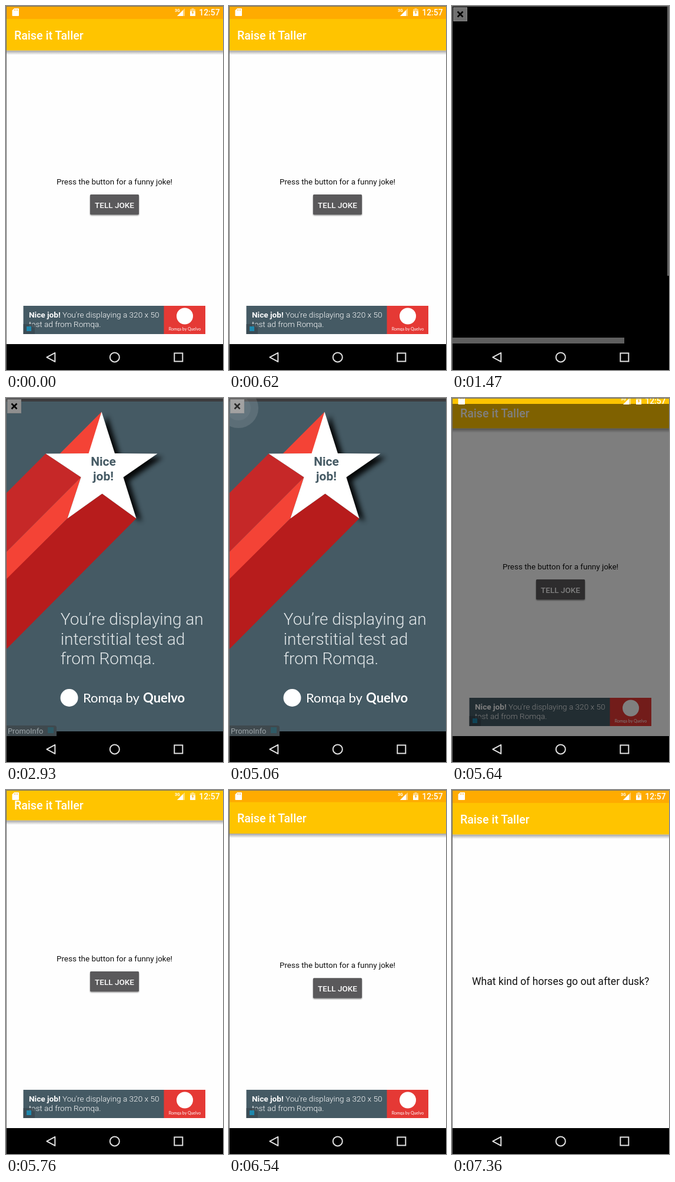
An HTML page that plays this animation: 369 px wide and 618 px high, repeating every 8 s.

```html
<!DOCTYPE html>
<html lang="en">
<head>
<meta charset="utf-8">
<title>Joke app</title>
<style>
  html, body { margin: 0; width: 100%; height: 100%; overflow: hidden; background: #000; }
  svg { display: block; width: 369px; height: 618px; font-family: Roboto, "Open Sans", sans-serif; }
  text { white-space: pre; }
  .mid { text-anchor: middle; }
  .medium { font-weight: 500; }
  .bold { font-weight: 700; }
  .light { font-weight: 300; }
  .logo { font-family: Lato, Roboto, sans-serif; }
</style>
</head>
<body>
<svg viewBox="0 0 369 618" xmlns="http://www.w3.org/2000/svg">
  <defs>
    <linearGradient id="fade" x2="0" y2="1">
      <stop offset="0" stop-color="#000" stop-opacity=".36"/>
      <stop offset="1" stop-color="#000" stop-opacity="0"/>
    </linearGradient>
    <filter id="soft" x="-20%" y="-20%" width="150%" height="150%"><feGaussianBlur stdDeviation="4"/></filter>
    <filter id="lift" x="-10%" y="-20%" width="120%" height="150%"><feGaussianBlur stdDeviation="1"/></filter>
    <clipPath id="buttonClip"><rect x="143" y="320" width="83" height="34" rx="1.5"/></clipPath>
    <clipPath id="stage"><rect width="369" height="574"/></clipPath>
    <path id="star" d="M162 23 184.500 93.500 257 94 199 134 221 204 163 162 104 204 127 134 67 94 140 93.500Z"/>
    <g id="toolbar">
      <rect y="75.500" width="369" height="7.500" fill="url(#fade)"/>
      <rect y="-30" width="369" height="105.500" fill="#ffc400"/>
      <text class="medium" x="14" y="57" font-size="19.600" fill="#fff">Raise it Taller</text>
    </g>
  </defs>

  <rect width="369" height="618"/>
  <g fill="none" stroke="#e2e2e2" stroke-width="2" transform="translate(.3 .4)">
    <path d="M69 596 83 588.500V603.500Z" stroke-linejoin="round"/>
    <circle cx="184.500" cy="596" r="8"/>
    <rect x="286" y="589" width="14" height="14"/>
  </g>

  <g id="main" clip-path="url(#stage)">
    <rect width="369" height="574" fill="#fefefe"/>
    <use id="mainBar" href="#toolbar"/>
    <rect id="mainTop" width="369" fill="#ffab00"/>
    <g id="prompt">
      <text class="mid" x="184.500" y="303" font-size="13.450" fill="#111">Press the button for a funny joke!</text>
      <rect x="143" y="321.500" width="83" height="34" rx="2" opacity=".5" filter="url(#lift)"/>
      <rect x="143" y="320" width="83" height="34" rx="1.500" fill="#5a595b"/>
      <g clip-path="url(#buttonClip)">
        <circle id="press" cx="184.500" cy="337" r="45" fill="#fff" opacity=".25"/>
      </g>
      <text class="mid medium" x="184.500" y="342.500" font-size="13.500" fill="#fff">TELL JOKE</text>
    </g>
    <rect x="29.500" y="509" width="239.500" height="48" fill="#455a64"/>
    <rect x="268.500" y="509" width="70.500" height="48" fill="#e53935"/>
    <g class="light" font-size="13.600" fill="#fff">
      <text x="39" y="528.500"><tspan class="bold">Nice job!</tspan> You're displaying a 320 x 50</text>
      <text x="39" y="544.500">test ad from Romqa.</text>
    </g>
    <path d="M29.500 540H46Q49 540 49 543V557H29.500Z" fill="#38474f" opacity=".75"/>
    <rect x="35" y="544" width="8" height="8" fill="#1f88ad"/>
    <circle cx="304" cy="526.500" r="14" fill="#fff"/>
    <text class="mid logo" x="304" y="551" font-size="7" fill="#fff">Romqa by Quelvo</text>
  </g>

  <g id="joke">
    <rect width="369" height="574" fill="#fefefe"/>
    <use href="#toolbar"/>
    <rect width="369" height="22" fill="#ffab00"/>
    <text class="mid" x="184.700" y="331" font-size="17.600" fill="#111">What kind of horses go out after dusk?</text>
  </g>

  <g id="dark">
    <rect width="369" height="574"/>
    <g id="scrollbars" fill="#5f5f5f">
      <rect x="366" width="3" height="458"/>
      <rect y="563" width="293" height="10"/>
    </g>
  </g>

  <g id="ad">
    <rect width="369" height="574"/>
    <rect width="369" height="7" fill="#3c3c3e"/>
    <rect y="6" width="369" height="560" fill="#455a64"/>
    <g transform="translate(.5 .5)">
      <use href="#star" x="9.500" y="6" opacity=".9" filter="url(#soft)"/>
      <path d="M162 23 145 94H91Z" fill="#f44336"/>
      <path d="M67 94 127 134-1 262V162Z" fill="#c62828"/>
      <path d="M127 134 104 204-1 309V262Z" fill="#f44336"/>
      <path d="M104 204 163 162 221 204-1 427V308Z" fill="#b71c1c"/>
      <use href="#star" fill="#fff"/>
    </g>
    <g class="mid bold" font-size="21" fill="#455a64">
      <text x="165.500" y="115">Nice</text>
      <text x="165.500" y="140">job!</text>
    </g>
    <g class="light" font-size="28" fill="#e3e8ea">
      <text x="92.800" y="385">You’re displaying an</text>
      <text x="92.800" y="418.500">interstitial test ad</text>
      <text x="92.800" y="452">from Romqa.</text>
    </g>
    <circle cx="107.500" cy="509" r="15" fill="#fff"/>
    <g class="logo" font-size="22" fill="#fff">
      <text x="131" y="517">Romqa by</text>
      <text class="bold" x="233" y="517">Quelvo</text>
    </g>
    <path d="M0 556H82Q86 556 86 560V574H0Z" fill="#3f494e"/>
    <text x="3" y="570" font-size="12.800" fill="#9ca5a9">PromoInfo</text>
    <rect x="71" y="559" width="10" height="10" fill="#2f5a65"/>
  </g>

  <g id="close">
    <rect id="closeFace" x="2.500" y="2.500" width="23" height="23" stroke="#858585"/>
    <path d="M9.500 9.500 18.500 18.500M18.500 9.500 9.500 18.500" stroke="#000" stroke-width="2.600"/>
  </g>
  <g id="touch" fill="#fff">
    <circle cx="16" cy="17" r="34" opacity=".12"/>
    <circle cx="16" cy="17" r="21" opacity=".05"/>
  </g>

  <rect id="darkTop" width="369"/>
  <g id="status" fill="#fff">
    <path d="M14 4H21Q22 4 22 5V16Q22 17 21 17H11.500Q10.500 17 10.500 16V7.500Z"/>
    <path d="M14.500 5.500V8M17 5.500V8M19.500 5.500V8" stroke="#ffb733" stroke-width="1"/>
    <text class="bold" x="287" y="9.500" font-size="7">3G</text>
    <path d="M304 4V17H291Z" opacity=".45"/>
    <path d="M301 7V17H291Z"/>
    <path d="M315.500 4H319.500V5.500H322V17H313V5.500H315.500Z" opacity=".5"/>
    <path d="M313 9H322V17H313Z"/>
    <path d="M318.500 7 315.500 11.500H317.500L316.500 15 319.500 10.500H317.500Z" fill="#ffab00"/>
    <text class="medium" x="328.300" y="15.800" font-size="13.900">12:57</text>
  </g>
  <path d="M.5 618V.5H369" fill="none" stroke="#6c6c6c"/>
</svg>
<script>
const LOOP = 8000;
const CHANGES = [0, 500, 620, 1040, 1170, 1330, 1470, 2930, 5060, 5210, 5340, 5490,
  5640, 5760, 5910, 6030, 6150, 6270, 6420, 6540, 6690, 6810, 7210, 7360];
const STATUS_H = 22, INSET = 24;

const el = {};
document.querySelectorAll('svg > [id], #mainBar, #mainTop, #prompt, #press, #scrollbars, #closeFace')
  .forEach(node => el[node.id] = node);

const show = (id, on) => el[id].setAttribute('display', on ? 'inline' : 'none');
const set = (id, name, value) => el[id].setAttribute(name, value);
const shift = (id, y) => set(id, 'transform', `translate(0 ${y})`);
const within = (t, from, to) => t >= from && t < to;

// How far the content sits above its place while the status bar inset grows back.
function missingInset(t) {
  if (!within(t, 5490, 6690)) return 0;
  const p = Math.max(0, (t - 5760) / 930);
  return INSET * (1 + Math.cos(Math.PI * p)) / 2;
}

// How far the status bar has slid off the top.
function statusLift(t) {
  if (within(t, 1330, 1470) || within(t, 5490, 5640)) return 16;
  if (within(t, 1470, 5490)) return STATUS_H;
  return within(t, 5640, 5760) ? 6 : 0;
}

function draw(time) {
  const t = CHANGES.findLast(c => c <= time);
  const opening = t === 1040, closing = t === 5640, entering = t === 7210;
  const missing = missingInset(t), lift = statusLift(t);

  show('main', t < 1170 || within(t, 5640, 7360));
  shift('mainBar', -missing);
  set('mainTop', 'height', STATUS_H * (1 - missing / INSET));
  shift('prompt', -missing / 2);
  show('press', t === 500 || t === 6690);

  show('joke', t >= 7210);
  shift('joke', entering ? 10 : 0);
  set('joke', 'opacity', entering ? .9 : 1);

  show('dark', within(t, 1040, 2930) || within(t, 5490, 5760));
  shift('dark', opening || closing ? 10 : 0);
  set('dark', 'opacity', opening ? .85 : closing ? .5 : 1);
  show('scrollbars', within(t, 1170, 2930));

  const adOn = within(t, 2930, 5490);
  show('ad', adOn);
  show('close', within(t, 1170, 5640));
  set('closeFace', 'fill', adOn ? '#8f8f8f' : '#707070');
  show('touch', within(t, 5060, 5340));
  set('touch', 'opacity', t === 5210 ? .5 : 1);

  show('darkTop', within(t, 1170, 5640));
  set('darkTop', 'height', STATUS_H - lift);
  show('status', lift < STATUS_H);
  shift('status', lift === 16 ? -15 : -lift);
}

function tick() {
  draw(performance.now() % LOOP);
  requestAnimationFrame(tick);
}
tick();
</script>
</body>
</html>
```
